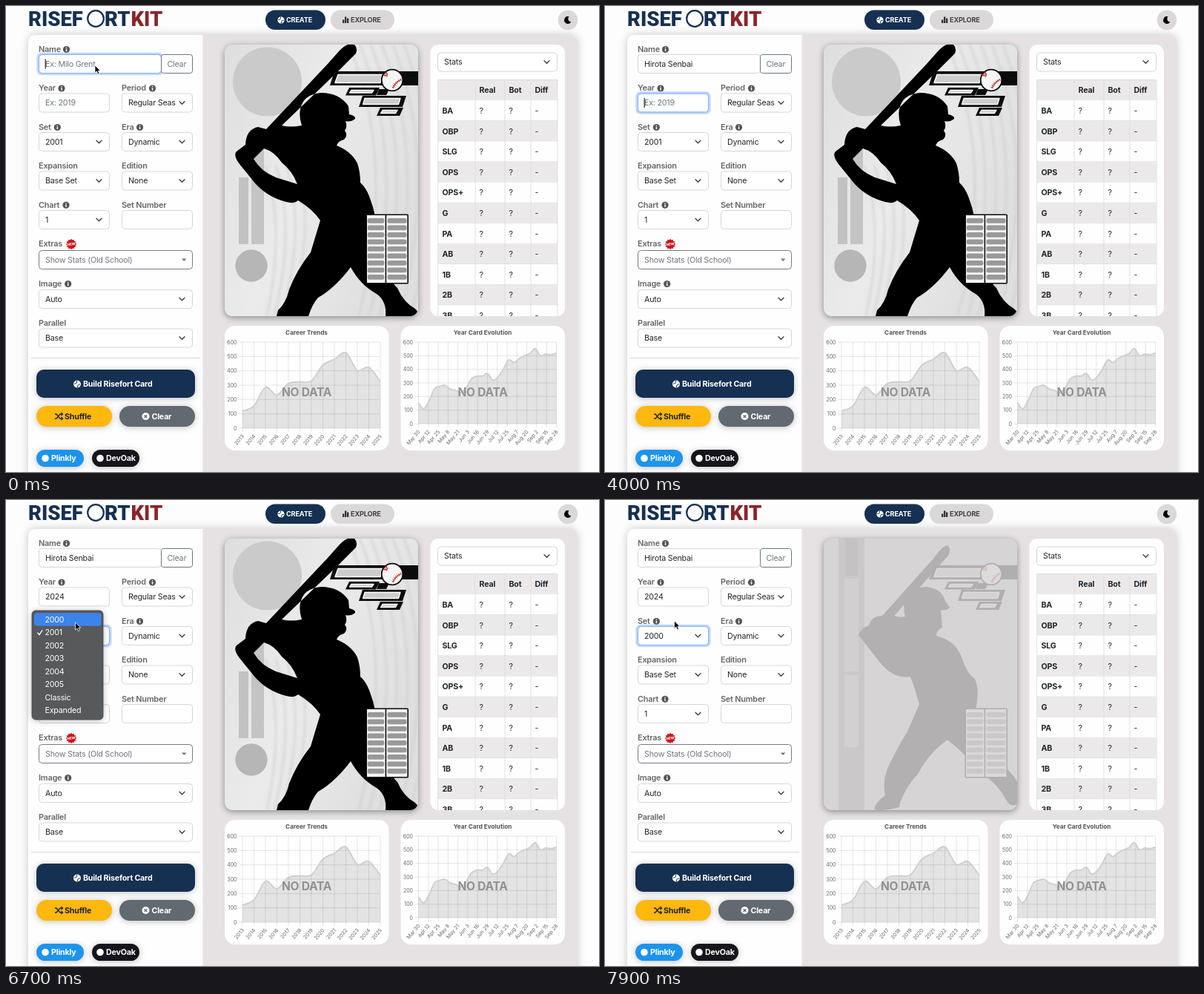
An HTML page that plays this animation: 800 px wide and 628 px high, repeating every 8000 ms.

```html
<!DOCTYPE html>
<html lang="en">
<head>
<meta charset="utf-8">
<title>Card builder</title>
<style>
html, body { margin: 0; width: 100%; height: 100%; overflow: hidden; background: #fdfdfd; }
svg { display: block; width: 800px; height: 628px; }
text { font: 400 10.7px Inter, "Liberation Sans", sans-serif; letter-spacing: -.02em; white-space: pre; fill: #212529; }
.b { font-weight: 700; }
.label { font-weight: 600; font-size: 10.9px; fill: #666; }
.hint { fill: #6c757d; }
.tick { font-size: 7px; fill: #666; letter-spacing: 0; }
.logo { font: 900 27.5px Roboto, sans-serif; letter-spacing: 0; }
.soft { filter: drop-shadow(0 1px 4px rgba(0, 0, 0, .25)); }
</style>
</head>
<body>
<svg id="stage" viewBox="0 0 800 628" xmlns="http://www.w3.org/2000/svg"></svg>
<script>
const NAVY = '#163052';
const stage = document.getElementById('stage');
const list = (n, fn) => Array.from({ length: n }, (_, i) => fn(i)).join('');

const rect = (x, y, w, h, fill, r = 0, more = '') =>
  `<rect x="${x}" y="${y}" width="${w}" height="${h}" rx="${r}" fill="${fill}" ${more}/>`;
const circle = (x, y, r, fill, more = '') => `<circle cx="${x}" cy="${y}" r="${r}" fill="${fill}" ${more}/>`;
const path = (d, fill, more = '') => `<path d="${d}" fill="${fill}" ${more}/>`;
const line = (d, color, w = 1, more = '') => path(d, 'none', `stroke="${color}" stroke-width="${w}" ${more}`);
// y is the middle of the line of text
const text = (x, y, s, cls = '', more = '') => `<text x="${x}" y="${y + 3.9}" class="${cls}" ${more}>${s}</text>`;

const box = (x, y, w, stroke = '#d3d6da') => rect(x + .5, y - 12.5, w - 1, 25, '#fff', 4, `stroke="${stroke}"`);
const chevron = (x, y) => line(`M${x - 3.5} ${y - 1.7}l3.5 3.5l3.5 -3.5`, '#343a40', 1.3, 'stroke-linecap="round" stroke-linejoin="round"');
const select = (x, y, w, value, id = '') =>
  box(x, y, w) + text(x + 9, y, value, '', id && `id="${id}"`) + chevron(x + w - 14.5, y);
const info = (x, y) => circle(x, y, 4.6, '#555') + rect(x - .7, y - .8, 1.5, 3.4, '#fff') + circle(x, y - 2.2, .8, '#fff');
const label = (x, y, s, iconX) => text(x, y, s, 'label') + (iconX ? info(iconX, y + .5) : '');
const ring = (id, x, y, w) => `<g id="${id}">` +
  rect(x - 1, y - 13.7, w + 2, 27.4, 'none', 5, 'stroke="#bfd7fe" stroke-width="3.2"') +
  rect(x + .5, y - 12.5, w - 1, 25, 'none', 4, 'stroke="#86b0f2"') + '</g>';
const ballIcon = (x, y, r, ink) => circle(x, y, r, '#fff') +
  line(`M${x - r * .8} ${y - r * .1}Q${x} ${y} ${x - r * .1} ${y - r * .9}M${x + r * .1} ${y + r * .9}Q${x} ${y} ${x + r * .8} ${y + r * .1}`, ink, 1);

function header() {
  return text(30, 23.1, 'RISEF', 'logo', `style="fill:${NAVY}"`) +
    circle(121, 17, 10.8, '#fff', `stroke="${NAVY}" stroke-width="2.2"`) +
    text(133, 23.1, 'RT', 'logo', `style="fill:${NAVY}"`) +
    text(168.5, 23.1, 'KIT', 'logo', 'style="fill:#8b2529"') +
    rect(350, 5.5, 81, 26.5, NAVY, 13.2) + ballIcon(371, 19, 4.6, NAVY) +
    text(378, 18.3, 'CREATE', 'b', 'style="fill:#fff;font-size:9.2px"') +
    rect(438, 5.5, 86, 26.5, '#dbd8d9', 13.2) +
    rect(454, 18.5, 2.3, 4.5, '#333') + rect(457, 14.5, 2.3, 8.5, '#333') + rect(460, 16.5, 2.3, 6.5, '#333') +
    text(465, 18.3, 'EXPLORE', 'b', 'style="fill:#444;font-size:9.2px"') +
    circle(758, 19, 13.3, '#dbd8d9') + path('M759.5 14.3a4.9 4.9 0 1 0 2.8 7.2a4.2 4.2 0 0 1 -2.8 -7.2z', '#000');
}

function form() {
  let burst = '';
  for (let i = 0; i < 24; i++) {
    const a = i * Math.PI / 12, r = i % 2 ? 5.7 : 7.2;
    burst += `${i ? 'L' : 'M'}${88 + r * Math.cos(a)} ${321 + r * Math.sin(a)}`;
  }
  return label(44, 58, 'Name', 81.5) + box(44, 78, 166) +
    ring('nameRing', 44, 78, 166) + rect(209.5, 65.5, 42, 25, '#fff', 3, 'stroke="#6c757d"') +
    text(217.5, 78, 'Clear', 'hint') + text(53, 78, '', '', 'id="name"') +
    label(44, 110.5, 'Year', 75) + box(44, 130.5, 96) + ring('yearRing', 44, 130.5, 96) + text(53, 130.5, '', '', 'id="year"') +
    label(156, 110.5, 'Period', 197.5) + select(156, 130.5, 96, 'Regular Seas') +
    label(44, 163, 'Set', 69.3) + select(44, 183, 96, '2001', 'set') + ring('setRing', 44, 183, 96) +
    label(156, 163, 'Era', 180.5) + select(156, 183, 96, 'Dynamic') +
    label(44, 215.3, 'Expansion') + select(44, 235.5, 96, 'Base Set') +
    label(156, 215.3, 'Edition') + select(156, 235.5, 96, 'None') +
    label(44, 267.8, 'Chart', 81) + select(44, 288, 96, '1') +
    label(156, 267.8, 'Set Number') + box(156, 288, 96) +
    label(44, 320.5, 'Extras') + path(burst + 'z', '#d0121b') +
    `<text x="88" y="322.6" text-anchor="middle" transform="rotate(-8 88 321)" style="font-size:4.6px;font-weight:800;fill:#fff">NEW</text>` +
    box(44, 342, 208, '#747b82') + text(53, 342, 'Show Stats (Old School)', 'hint') + path('M237 340.5h6.4l-3.2 3.4z', '#6c757d') +
    label(44, 374, 'Image', 83.7) + select(44, 395, 208, 'Auto') +
    label(44, 426.8, 'Parallel') + select(44, 447.5, 208, 'Base') +
    rect(34, 474, 228, 1, '#d8d8da') + buttons();
}

function buttons() {
  const pill = (x, y, w, h, fill, r) => rect(x, y, w, h, fill, r, 'class="soft"');
  const white = 'style="fill:#fff"';
  return pill(41, 490, 214, 38, NAVY, 10) + ballIcon(96, 509.5, 5, NAVY) + text(104, 509.3, 'Build Risefort Card', 'b', white) +
    pill(41, 539, 102, 28, '#ffb80d', 14) + text(79, 553, 'Shuffle', 'b') +
    line('M66 550h2l5 6h3M66 556h2l5 -6h3M74.5 548l2 2l-2 2M74.5 554l2 2l-2 2', '#212529', 1.3) +
    pill(153, 539, 102, 28, '#626970', 14) + circle(188.5, 553, 5, '#fff') + line('M186.7 551.2l3.6 3.6m0 -3.6l-3.6 3.6', '#626970', 1.4) +
    text(196.5, 553, 'Clear', 'b', white) +
    pill(41, 598, 64, 23, '#1d94ec', 11.5) + circle(53, 609.5, 4.8, '#fff') + text(61, 609.5, 'Plinkly', 'b', white) +
    pill(116, 598, 64, 23, '#15151b', 11.5) + circle(127, 609.5, 4.8, '#fff') + text(135, 609.5, 'DevOak', 'b', white);
}

// Name bars, ball and stat grid shared by both card templates
function cardFrame() {
  const bar = (x, y, w, h) => path(`M${x + 5} ${y}h${w}l-5 ${h}h${-w}z`, '#0b0b0b') +
    path(`M${x + 8} ${y + 3.5}h${w - 11}l-2.5 ${h - 7}h${13 - w - 2}z`, '#ccc', 'stroke="#fff" stroke-width="1.3" stroke-linejoin="round"');
  let seams = '';
  for (const s of [-1, 1])
    seams += line(`M${521 + s * 5 - 4} ${100 + s * 11}Q${521 + s * 3} ${100 + s * 4} ${521 + s * 12} ${100 + s * 3 - 4}`, '#c22a2c', 1.2) +
      line(`M${521 + s * 5 - 4} ${100 + s * 10}Q${521 + s * 3} ${100 + s * 4} ${521 + s * 12} ${100 + s * 3 - 4}`, '#c22a2c', 3.6, 'stroke-dasharray=".7 1.8"');
  return path('M443 88H556V107H437z', '#0b0b0b') +
    path('M448 92.5H508L505 103.5H444z', '#ccc', 'stroke="#fff" stroke-width="1.5" stroke-linejoin="round"') +
    path('M538 90h18v15h-20z', '#0b0b0b') +
    bar(458, 110, 41, 10.5) + path('M503 112h14l-4 8h-13z', '#0b0b0b') + bar(476, 121, 59, 15) + bar(500, 137, 31, 11) +
    circle(521, 100, 14.3, '#f6f6f4', 'stroke="#0b0b0b" stroke-width="1.8"') + seams +
    rect(486.2, 281.2, 56, 92.6, '#f4f4f4', 1, 'stroke="#0b0b0b" stroke-width="1.6"') + rect(511.6, 281, 1.6, 93, '#0b0b0b') +
    list(9, i => rect(487.8, 286 + i * 9.5, 22.5, 6.8, '#999', 2.5) + rect(514.5, 286 + i * 9.5, 26, 6.8, '#999', 2.5));
}

const BATTER_A = 'M351 166L434 78L450 60Q456 54 461 52H470Q475 57 472 64L448 88L372 161Q384 164 399 161Q395 149 397 139' +
  'Q401 119 425 117Q450 117 462 135L463 146Q472 148 471 152Q465 157 458 155Q461 163 457 168Q462 174 456 180Q448 182 446 188' +
  'Q466 196 474 212Q478 224 478 238Q487 246 492 262Q499 280 499 300L505 340Q518 371 528 380Q536 399 552 408Q558 413 554 418H512' +
  'Q514 398 500 388Q478 376 465 352Q444 380 421 393Q413 402 408 418H365L367 410Q378 400 382 382Q392 356 411 332Q417 312 424 289' +
  'Q414 274 394 262Q389 267 378 264Q354 258 337 240L315 213Q306 201 311 196L323 187Q324 166 340 163Z' +
  'M348 192L334 206Q344 223 364 231L393 240Q386 222 372 211Q362 196 348 192Z';
const BATTER_B = 'M374 156L443 79Q456 61 462 61Q468 66 463 75L390 156Q398 159 405 157Q402 146 404 136Q410 118 433 117' +
  'Q454 119 459 136L465 145Q460 150 453 148L455 171Q446 178 447 183Q474 190 482 214Q488 234 499 241Q506 256 500 282' +
  'Q510 321 529 352Q550 366 557 382V409Q548 416 541 404Q530 382 505 366Q486 342 462 323Q436 342 423 368Q406 386 398 408L397 414' +
  'Q374 420 363 417Q366 406 378 398Q374 378 382 360Q393 336 408 312L424 275Q416 248 412 238Q390 242 371 219L342 182Q346 172 356 169Q360 156 374 156Z';

function cards() {
  const waves = list(6, i => line(`M${462 + i * 15} 52Q${528 + i * 14} 210 ${476 + i * 14} 418`, '#cfcfcf', 3)) +
    list(4, i => line(`M${350 + i * 14} 215Q${377 + i * 14} 300 ${352 + i * 10} 418`, '#d0d0d0', 3));
  return rect(295, 52, 261, 366, '#d7d3d5', 11, 'style="filter:drop-shadow(0 2px 4px rgba(0,0,0,.4))"') +
    `<g clip-path="url(#cardClip)"><g id="cardA">` + rect(295, 52, 261, 366, 'url(#paper)') +
    `<g opacity=".6" filter="url(#blur)">${waves}</g>` +
    circle(352.5, 102, 46.5, '#cacaca') + rect(331, 193, 17, 128, '#c4c4c4') + rect(314, 231, 13, 90, '#c2c2c2') +
    circle(331, 350, 21.7, '#b6b6b6') + path(BATTER_A, '#000', 'fill-rule="evenodd"') + cardFrame() + '</g>' +
    '<g id="cardB">' + rect(295, 52, 261, 366, '#d8d8d8') + rect(315, 52, 35, 366, '#999') +
    rect(324, 52, 17, 50, '#777') + rect(323, 106, 19, 125, '#bbb') + rect(323, 236, 19, 97, '#c4c4c4') +
    path(BATTER_B, '#161616') + cardFrame() + '</g></g>';
}

function stats() {
  const names = ['BA', 'OBP', 'SLG', 'OPS', 'OPS+', 'G', 'PA', 'AB', '1B', '2B', '3B'];
  const rows = names.map((n, i) => {
    const y = 141 + i * 27.6;
    return rect(583, y - 13.8, 161, 27.6, i % 2 ? '#ebe9ea' : '#fefefe') + rect(583, y + 13.3, 161, .8, '#dcdadb') +
      text(588.5, y, n, 'b') + text(638.5, y, '?') + text(678.5, y, '?') + text(713.5, y, '-');
  }).join('');
  return rect(572.5, 52, 181.5, 366, '#fefefe', 11) + select(582, 75.5, 162, 'Stats') + '<g clip-path="url(#statsClip)">' +
    rect(583, 99, 161, 28.2, '#ebe9ea') + rows + text(638.5, 113.5, 'Real', 'b') + text(678.5, 113.5, 'Bot', 'b') + text(713.5, 113.5, 'Diff', 'b') +
    line('M582.6 418V99.5H744V418M633 99V418M673 99V418M708 99V418', '#dcdadb', .8) + '</g>';
}

function smooth(points) {
  let d = `M${points[0]}`;
  for (let i = 0; i + 1 < points.length; i++) {
    const [a, b] = [points[i], points[i + 1]];
    const p = points[i - 1] || a, n = points[i + 2] || b;
    d += `C${a[0] + (b[0] - p[0]) / 6} ${a[1] + (b[1] - p[1]) / 6} ${b[0] - (n[0] - a[0]) / 6} ${b[1] - (n[1] - a[1]) / 6} ${b}`;
  }
  return d;
}

function chart(x, title, height, labels, data) {
  const left = x + 24, top = 453, w = 186, bottom = top + height, step = w / (labels.length - 1);
  const curve = smooth(data.map((v, i) => [left + i * w / (data.length - 1), bottom - v / 600 * height]));
  return rect(x, 431, 221.5, 168, '#fefefe', 14) +
    text(x + 110.5, 439.5, title, 'b', 'text-anchor="middle" style="font-size:8.2px;fill:#555;letter-spacing:0"') +
    path(`${curve}V${bottom}H${left}Z`, '#e3e3e3') +
    list(7, i => {
      const y = bottom - i * height / 6;
      return line(`M${left - 5} ${y}h${w + 5}`, '#000', .7, 'opacity=".14"') +
        `<text class="tick" text-anchor="end" x="${left - 7.5}" y="${y + 2.6}">${i * 100}</text>`;
    }) +
    labels.map((s, i) => {
      const lx = left + i * step;
      return line(`M${lx} ${top}v${height + 5}`, '#000', .7, 'opacity=".14"') +
        `<text class="tick" text-anchor="end" transform="translate(${lx + 2.5} ${bottom + 11}) rotate(-50)">${s}</text>`;
    }).join('') +
    line(curve, '#d0d0d0', 2) +
    `<text class="b" text-anchor="middle" x="${x + 110.5}" y="525.5" style="font-size:15.6px;fill:#929292">NO DATA</text>`;
}

function menu() {
  const items = ['2000', '2001', '2002', '2003', '2004', '2005', 'Classic', 'Expanded'];
  return `<g id="menu">` + rect(35, 149, 96, 147, '#58595b', 5, 'stroke="#454648" stroke-width=".8" class="soft"') +
    `<rect id="pick" x="38" width="90.5" height="17.5" rx="3.5" fill="#3d83ec"/>` +
    items.map((s, i) => text(52.5, 161 + i * 17.5, s, '', 'style="fill:#fff"')).join('') +
    line('M42.8 179l2.2 2.7l3.8 -6', '#fff', 1.3, 'stroke-linecap="round"') + '</g>';
}

const years = Array.from({ length: 13 }, (_, i) => 2013 + i);
const dates = Array.from({ length: 15 }, (_, i) =>
  new Date(2025, 2, 30 + 13 * i).toLocaleDateString('en-US', { month: 'short', day: 'numeric' }));

stage.innerHTML = `<defs>
  <clipPath id="cardClip">${rect(295, 52, 261, 366, '#000', 11)}</clipPath>
  <clipPath id="statsClip">${rect(573, 52, 181, 366, '#000', 11)}</clipPath>
  <filter id="blur"><feGaussianBlur stdDeviation="1.4"/></filter>
  <linearGradient id="paper" x2="1" y2=".5"><stop stop-color="#dedede"/><stop offset=".5" stop-color="#ebebeb"/><stop offset="1" stop-color="#dfdfdf"/></linearGradient>
  </defs>` +
  rect(30, 39, 741, 620, '#e6e2e3', 11, 'style="filter:drop-shadow(0 0 6px rgba(0,0,0,.22))"') +
  path('M41 39H265.5V628H30V50Q30 39 41 39z', '#fefefe') +
  header() + form() + cards() + stats() +
  chart(295, 'Career Trends', 116, years, [120, 155, 285, 232, 312, 323, 330, 440, 480, 525, 402, 425, 325]) +
  chart(532.5, 'Year Card Evolution', 110, dates,
    [155, 110, 170, 255, 275, 283, 255, 245, 228, 265, 330, 350, 350, 370, 320, 345, 400, 470, 450, 480, 500, 515, 552, 500, 513, 508, 520]) +
  menu() + '<rect id="caret" width="1.1" height="13" fill="#111"/>' +
  path('M0 0V10.2L2.4 8L4 11.8L5.9 11L4.3 7.3H7.4Z', '#000', 'id="pointer" stroke="#fff" stroke-width=".8"');

const el = {};
for (const node of stage.querySelectorAll('[id]')) el[node.id] = node;
const show = (node, on) => { node.style.display = on ? '' : 'none'; };

const NAME = 'Hirota Senbai', YEAR = '2024';
const NAME_START = 1050, YEAR_FOCUS = 3900, YEAR_START = 4350, KEY = 150;
const MENU_OPEN = 6050, MENU_CLOSE = 7300, SET_CHANGE = 7500, FADE_START = 7700;
const typed = (s, start, t) => s.slice(0, Math.max(0, Math.floor((t - start) / KEY) + 1));

function fill(node, value, hint) {
  node.textContent = value || hint;
  node.setAttribute('class', value ? '' : 'hint');
}

const track = [[0, 120, 80], [5200, 120, 80], [5700, 93, 181], [6200, 93, 181], [6600, 93.5, 165], [7300, 93.5, 163], [8000, 93.5, 163]];
function pointerAt(t) {
  const i = track.findIndex(k => k[0] > t), a = track[i - 1], b = track[i];
  const u = (t - a[0]) / (b[0] - a[0]), e = u * u * (3 - 2 * u);
  return [a[1] + (b[1] - a[1]) * e, a[2] + (b[2] - a[2]) * e];
}

function draw(t) {
  const name = typed(NAME, NAME_START, t), year = typed(YEAR, YEAR_START, t);
  const onName = t < YEAR_FOCUS, onSet = t >= MENU_OPEN, onYear = !onName && !onSet;
  fill(el.name, name, 'Ex: Milo Grent');
  fill(el.year, year, 'Ex: 2019');
  el.set.textContent = t < SET_CHANGE ? '2001' : '2000';
  show(el.nameRing, onName);
  show(el.yearRing, onYear);
  show(el.setRing, onSet);

  // The caret blinks from the last key press
  const [value, field, start, focus, y] = onName ? [name, el.name, NAME_START, 0, 71.5] : [year, el.year, YEAR_START, YEAR_FOCUS, 124];
  const lastKey = value ? start + (value.length - 1) * KEY : focus;
  show(el.caret, !onSet && (t - lastKey) % 1000 < 500);
  el.caret.setAttribute('x', 52.6 + (value ? field.getComputedTextLength() : 0));
  el.caret.setAttribute('y', y);

  const [px, py] = pointerAt(t);
  show(el.pointer, t < NAME_START || t >= 5200);
  el.pointer.setAttribute('transform', `translate(${px} ${py})`);
  show(el.menu, t >= MENU_OPEN && t < MENU_CLOSE);
  el.pick.setAttribute('y', py > 170 ? 169.8 : 152.2);

  show(el.cardA, t < FADE_START);
  el.cardB.setAttribute('opacity', Math.max(0, (t - FADE_START) / 1100));
}

const origin = performance.now();
function tick() {
  draw((performance.now() - origin) % 8000);
  requestAnimationFrame(tick);
}
tick();
</script>
</body>
</html>
```
